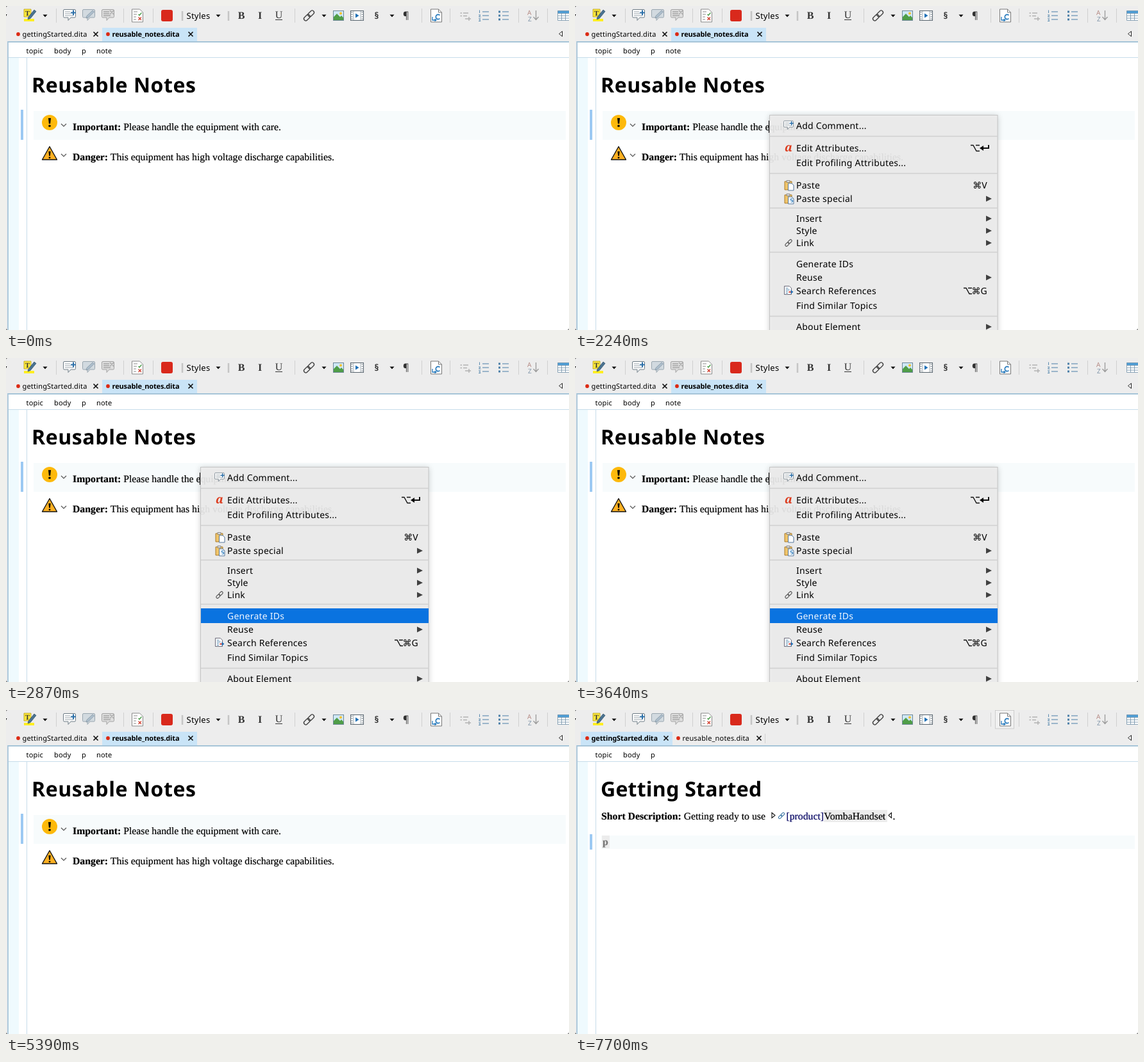
These frames come from a looping animation (878 by 506 pixels, 8000 ms). An HTML page:

```html
<!DOCTYPE html>
<html lang="en">
<head>
<meta charset="utf-8">
<title>Reusable notes</title>
<style>
html, body { margin: 0; width: 100%; height: 100%; overflow: hidden; background: #fff; }
svg { display: block; width: 878px; height: 506px; text-rendering: geometricPrecision; }
text { white-space: pre; }
.ui { font: 11px "Noto Sans", sans-serif; letter-spacing: .18px; }
.ui .on { font-weight: 700; letter-spacing: -.14px; }
.menu { font: 14px "Noto Sans", sans-serif; letter-spacing: .25px; }
.key { font: 14px "DejaVu Sans", sans-serif; letter-spacing: 0; }
.serif { font: 15.75px "Liberation Serif", serif; fill: currentColor; stroke: currentColor; stroke-width: .2px; }
.b { font-weight: 700; }
.h1 { font: 700 32px "Noto Sans", sans-serif; letter-spacing: .4px; }
.mark { font: 700 16px "Liberation Serif", serif; text-anchor: middle; fill: #333; }
.line { fill: none; stroke: #d0d0d0; }

.t { animation: 8s step-end infinite; }
.page1 { animation-name: page1; }
.page2 { animation-name: page2; }
.saved { animation-name: saved; }
.dirty { animation-name: dirty; }
.caret1 { animation-name: caret1; }
.caret2 { animation-name: caret2; }
.pointer { animation-name: pointer; }
.popup { animation-name: popup; }
.pick { animation-name: pick; }
.hover { animation-name: hover; }

@keyframes page1 { 0% { opacity: 1 } 69.125%, to { opacity: 0 } }
@keyframes page2 { 0% { opacity: 0 } 69.125%, to { opacity: 1 } }
@keyframes saved { 0%, 54.25% { opacity: 1 } 47.25%, 69.125%, to { opacity: 0 } }
@keyframes dirty { 0%, 54.25%, to { opacity: 0 } 47.25% { opacity: 1 } }
@keyframes caret1 { 0%, 54.25%, 67.375%, to { opacity: 0 } 14%, 60.375% { opacity: 1 } }
@keyframes caret2 { 0%, 82.25%, 95.375%, to { opacity: 0 } 76.125%, 89.25% { opacity: 1 } }
@keyframes pointer { 0%, 21%, to { opacity: 0 } 19.25% { opacity: 1 } }
@keyframes popup { 0%, 47.25%, to { opacity: 0 } 21% { opacity: 1 } 46.375% { opacity: .5 } }
@keyframes hover { 0% { opacity: 0 } 94.5%, to { opacity: 1 } }
@keyframes pick {
  0%, 28%, 34.125%, 44.625%, 46.375%, to { transform: translateY(-99px) }
  22.75% { transform: translateY(175px) }
  28.875% { transform: translateY(210px) }
  29.75% { transform: translateY(233px) }
  30.625% { transform: translateY(289px) }
  31.5% { transform: translateY(320px) }
  32.375% { transform: translateY(358px) }
  35.875%, 45.5% { transform: translateY(391px) }
}
</style>
</head>
<body>
<svg viewBox="0 0 878 506" xmlns="http://www.w3.org/2000/svg">
<defs>
  <path id="down" d="M-3.5-1.5h7L0 2.2z"/>
  <path id="close" d="M-3.5-3.5l7 7m0-7l-7 7" fill="none" stroke="#111" stroke-width="1.7"/>
  <circle id="dot" r="2.9" fill="#dc2a14"/>
  <path id="chev" d="M-4-2l4 4 4-4" fill="none" stroke="#555" stroke-width="1.2"/>
  <path id="bubble" d="M-8-8.5h16q1.500 0 1.500 1.500v9.500q0 1.500-1.500 1.500h-6l-4 4.500v-4.500h-6q-1.500 0-1.500-1.500v-9.500q0-1.500 1.500-1.500z"/>
  <path id="sheet" d="M-8.5-10h12l5 5v15h-17z"/>
  <g id="comment">
    <use href="#bubble" fill="#fff" stroke="#6c7a84"/>
    <path d="M-7-5h8m-8 3h9m-9 3h13" stroke="#9aa4ab"/>
    <path d="M6-7.500v8M2-3.500h8" stroke="#2a6ea8" stroke-width="2"/>
  </g>
  <g id="link" fill="none" transform="rotate(-45)">
    <rect x="-10" y="-3" width="11" height="6" rx="3"/>
    <rect x="-1" y="-3" width="11" height="6" rx="3"/>
  </g>
  <path id="sub" d="M641-4.5l9 4.5-9 4.5z" opacity=".72"/>
  <g id="bang"><path d="M-2-7.500h4l-.9 8.800h-2.200z"/><circle cy="4.800" r="1.800"/></g>
  <g id="paste">
    <path d="M-7-6h11v13h-11z" fill="#f0c56a" stroke="#a97b2b"/>
    <path d="M-4-7.500h5v3h-5z" fill="#ddd" stroke="#777" stroke-width=".8"/>
    <path d="M-1.500-3h5.500l3 3v8h-8.500z" fill="#fff" stroke="#54779b"/>
  </g>
  <clipPath id="row"><rect class="t pick" x="304" width="355" height="23"/></clipPath>
</defs>

<!-- window -->
<rect width="878" height="506" fill="#fff"/>
<path d="M0 0h878v56H3v450H0z" fill="#ededed"/>
<rect x="4" y="81" width="16" height="425" fill="#effafe"/>
<path d="M32.500 81v425M4 80.500h874" class="line" style="stroke:#c6dcea"/>
<path d="M878 56H3v450" fill="none" stroke="#a6c4d8" stroke-width="1.800"/>

<!-- toolbar -->
<rect class="t hover" x="655.500" y=".5" width="29" height="28.500" fill="#f1f1f1" stroke="#cdcdcd"/>
<path class="line" d="M78.500 4v22M183.500 4v22M229.500 4v22M450.500 4v22M648.500 4v22M692.500 4v22M799.500 4v22M844.500 4v22"/>
<path class="line" d="M275 8v15M347 8v15" stroke-width="2.500" style="stroke:#c5c5c5"/>
<path d="M0 13h1.500l-1.500 3z"/>
<use href="#down" x="61" y="15"/>
<use href="#down" x="331" y="15"/>
<use href="#down" x="496" y="15"/>
<use href="#down" x="602" y="15"/>

<path d="M28 5h11v12h-11z" fill="#ffe83b" stroke="#b5a01a" stroke-width=".8"/>
<path d="M28 20h16v4h-16z" fill="#ffee22"/>
<text x="33.500" y="15" class="mark" style="font-size:11px">T</text>
<path d="M44 6l3 2.500-9 11-4 1.500 1-4z" fill="#4a7391" stroke="#2b4c68" stroke-width=".7"/>

<use href="#comment" x="99" y="14"/>
<g transform="translate(129 14)">
  <use href="#bubble" fill="#d2dae0" stroke="#98a5af"/>
  <path d="M6-7l2.500 2-9 9-3.500 1 1-3.500z" fill="#aebfcd" stroke="#8293a1" stroke-width=".8"/>
</g>
<g transform="translate(159 14)">
  <use href="#bubble" fill="#dedede" stroke="#a2a2a2"/>
  <path d="M-7-5h9m-9 3h9m-9 3h11M3-7l6 6m0-6l-6 6" stroke="#a6a6a6" stroke-width="1.300"/>
</g>
<g transform="translate(205 15)">
  <use href="#sheet" fill="#fff" stroke="#888"/>
  <path d="M-6-6h6m-6 4h5m-5 4h4m-4 4h4" stroke="#8a8a8a"/>
  <path d="M1.500-2l1.500 1.500 3.500-4" fill="none" stroke="#3c963c" stroke-width="1.200"/>
  <path d="M1.500 2.500l4.500 4.500m0-4.500l-4.500 4.500" stroke="#d23a2a" stroke-width="1.300"/>
</g>
<rect x="242" y="6" width="18" height="18" rx="3" fill="#d9291c"/>
<text x="281.500" y="20" class="menu" style="font-size:13px">Styles</text>
<text x="367" y="20" class="mark">B</text>
<text x="396" y="20" class="mark" font-style="italic">I</text>
<text x="425.500" y="19" class="mark" style="font-weight:400">U</text>
<path d="M420 21.500h11" stroke="#333"/>
<g transform="translate(472.500 15)" stroke="#444" stroke-width="1.400"><use href="#link"/></g>
<g transform="translate(518.500 15)">
  <rect x="-8" y="-7.500" width="16" height="15" fill="#cfe8f6" stroke="#6d8797"/>
  <path d="M-7.500 7v-5l5-5 5 5 2-2 3 3v4z" fill="#4f9e48"/>
  <circle cx="3.500" cy="-3.500" r="2" fill="#f6c22d"/>
</g>
<g transform="translate(547.500 15)">
  <rect x="-10" y="-7.500" width="20" height="15" fill="#fff" stroke="#55626c"/>
  <path d="M-8-6v13M8-6v13" stroke="#6a767f" stroke-width="1.500" stroke-dasharray="1.500 2"/>
  <path d="M-5.500-7v14M5.500-7v14" stroke="#8a969e" stroke-width=".8"/>
  <path d="M-2.500-3.500l5.500 3.500-5.500 3.500z" fill="#1f6fb5"/>
</g>
<text x="578" y="20" class="mark" style="font:700 14px 'Noto Sans',sans-serif">§</text>
<text x="624" y="20" class="mark" style="font:15px 'Noto Sans',sans-serif">¶</text>
<g transform="translate(671 15)">
  <use href="#sheet" fill="#fff" stroke="#777"/>
  <path d="M3.500-10v5h5" fill="none" stroke="#777"/>
  <path d="M5.500-.5a3.600 3.600 0 1 0 0 5" fill="none" stroke="#2277bb" stroke-width="1.600"/>
  <path d="M-6 2v5h4" fill="none" stroke="#2277bb" stroke-width="1.300"/>
  <path d="M-2.500 4.500l3.500 2.500-3.500 2.500z" fill="#2277bb"/>
</g>
<g fill="none" stroke="#b2b2b2" stroke-width="1.500">
  <path d="M713 11h8M713 15.500h6M716 20h3M719 20h6M722 17v6"/>
  <path d="M708.500 11h2.500M708.500 15.500h2.500"/>
</g>
<g fill="none" stroke="#4a7fa8" stroke-width="1.200">
  <path d="M743 9h10M743 15h10M743 21h10"/>
  <path d="M738.500 6.500v4.500M737 14h3l-2.500 3h3M737 20h3l-1.500 1.500 1.500 2h-3" stroke-width=".9"/>
  <path d="M774 9h10M774 15h10M774 21h10"/>
  <path d="M768 9h3M768 15h3M768 21h3" stroke-width="3"/>
</g>
<g style="font:10px 'Noto Sans',sans-serif">
  <text x="813" y="14" fill="#b58a84">A</text><text x="814" y="24" fill="#8498ab">Z</text>
  <path d="M826.500 7v14m-4-4l4 4.500 4-4.500" fill="none" stroke="#999" stroke-width="1.300"/>
</g>
<path d="M860.500 7.500h18v15h-18z" fill="#fff"/>
<path d="M860.500 7.500h18v4h-18z" fill="#4f9ed6"/>
<path d="M878 7.500h-17.500v15h17.500M860.500 11.500h18M860.500 15.200h18M860.500 19h18M866.500 11v11.500M872.500 11v11.500" fill="none" stroke="#6f8fa6" stroke-width=".8"/>
<path d="M867.500 39.500v8l-5-4z" fill="#fff" stroke="#222"/>

<!-- tabs -->
<g class="ui">
  <g class="t page1">
    <use href="#dot" x="19" y="44"/>
    <text x="25.500" y="48">gettingStarted.dita</text>
    <use href="#close" x="140" y="44"/>
  </g>
  <g class="t saved">
    <path d="M150 34h148v21h-148z" fill="#c9e4f7"/>
    <use href="#dot" x="159" y="44"/>
    <text class="on" x="165.500" y="48">reusable_notes.dita</text>
    <use href="#close" x="288" y="44"/>
  </g>
  <g class="t dirty">
    <path d="M150 34h153v21h-153z" fill="#c9e4f7"/>
    <use href="#dot" x="158" y="44"/>
    <text class="on" x="164.500" y="48">reusable_notes.dita*</text>
    <use href="#close" x="293" y="44"/>
  </g>
  <g class="t page2">
    <path d="M9 34h143v21h-143z" fill="#c9e4f7"/>
    <use href="#dot" x="19" y="44"/>
    <text class="on" x="25.500" y="48">gettingStarted.dita</text>
    <use href="#close" x="142" y="44"/>
    <use href="#dot" x="161" y="44"/>
    <text x="167.500" y="48">reusable_notes.dita</text>
    <use href="#close" x="287" y="44"/>
    <path class="line" d="M296.500 37v15"/>
  </g>
  <text x="31.500" y="74">topic</text>
  <text x="75" y="74">body</text>
  <text x="118" y="74">p</text>
  <text class="t page1" x="141" y="74">note</text>
</g>

<!-- notes page -->
<g class="t page1">
  <rect x="43" y="164" width="830" height="45" fill="#f7fbfc"/>
  <rect x="23" y="162" width="4" height="47" fill="#9cc9f3"/>
  <text class="h1" x="40" y="135" style="letter-spacing:.6px">Reusable Notes</text>
  <circle cx="68" cy="182" r="12" fill="#fdb90b"/>
  <use href="#bang" x="68" y="182.500"/>
  <path d="M68 219.500l11.500 20.500h-23z" fill="#fdb022" stroke="#111" stroke-width="1.400" stroke-linejoin="round"/>
  <g transform="translate(68 233) scale(.8)"><use href="#bang"/></g>
  <use href="#chev" x="90" y="186"/>
  <use href="#chev" x="90" y="233"/>
  <text class="serif" x="104" y="194"><tspan class="b">Important:</tspan> Please handle the equipment with care.</text>
  <text class="serif" x="104" y="241"><tspan class="b">Danger:</tspan> This equipment has high voltage discharge capabilities.</text>
  <rect class="t caret1" x="302" y="179" width="2" height="19"/>
  <path class="t pointer" d="M303.500 186v15l3.500-3.300 2.300 5.400 2.600-1.100-2.300-5.200h4.800z" stroke="#fff" stroke-width=".9"/>
</g>

<!-- topic page -->
<g class="t page2">
  <rect x="41" y="196" width="832" height="21" fill="#f7fbfc"/>
  <rect x="23" y="194" width="4" height="24" fill="#9cc9f3"/>
  <text class="h1" x="40" y="135" style="letter-spacing:.25px">Getting Started</text>
  <rect x="388" y="156" width="99" height="19" fill="#ececec"/>
  <text class="serif" x="41" y="171"><tspan class="b">Short Description:</tspan> Getting ready to use</text>
  <path d="M307 160.500v8l5-4zM493.500 160.500v8l-4.500-4z" fill="#fff" stroke="#111" stroke-width="1.100"/>
  <g transform="translate(322 165) scale(.58)" stroke="#3a74a3" stroke-width="1.900"><use href="#link"/></g>
  <text class="serif" x="329.500" y="171" color="#000060">[product]</text>
  <text class="serif" x="388.300" y="171">VombaHandset</text>
  <text class="serif" x="495.500" y="171">.</text>
  <rect x="42" y="196" width="12" height="20" fill="#ececec"/>
  <text class="serif" x="43" y="211" color="#777"><tspan class="b">p</tspan></text>
  <rect class="t caret2" x="40" y="194" width="2" height="23"/>
</g>

<!-- context menu -->
<g class="t popup">
  <rect x="303.500" y="170.500" width="355.500" height="350" fill="#ececec" fill-opacity=".93" stroke="#c4c4c4" style="filter:drop-shadow(0 1px 4px rgba(0,0,0,.2))"/>
  <path class="line" d="M304 203.500h355M304 261.500h355M304 315.500h355M304 384.500h355M304 484.500h355" stroke-width="1.500"/>
  <g id="labels" class="menu">
    <text x="345" y="192">Add Comment...</text>
    <text x="345" y="227">Edit Attributes...</text>
    <text x="345" y="250">Edit Profiling Attributes...</text>
    <text x="345" y="285">Paste</text>
    <text x="345" y="306">Paste special</text>
    <text x="345" y="337">Insert</text>
    <text x="345" y="356">Style</text>
    <text x="345" y="375">Link</text>
    <text x="345" y="408">Generate IDs</text>
    <text x="345" y="429">Reuse</text>
    <text x="345" y="450">Search References</text>
    <text x="345" y="473">Find Similar Topics</text>
    <text x="345" y="506">About Element</text>
    <path d="M617 217.500h4l5 9h5M625 217.500h6" fill="none" stroke="#111" stroke-width="1.400"/>
    <path d="M645 217v5h-9" fill="none" stroke="#111" stroke-width="2"/>
    <path d="M631 222l6-4v8z"/>
    <text x="643" y="285" text-anchor="end"><tspan class="key">⌘</tspan>V</text>
    <path d="M606 440.500h4l5 9h4M613 440.500h6" fill="none" stroke="#111" stroke-width="1.400"/>
    <text x="643" y="450" text-anchor="end"><tspan class="key">⌘</tspan>G</text>
    <use href="#sub" y="301"/>
    <use href="#sub" y="332"/>
    <use href="#sub" y="351"/>
    <use href="#sub" y="370"/>
    <use href="#sub" y="424"/>
    <use href="#sub" y="501"/>
  </g>
  <g clip-path="url(#row)">
    <rect x="304" y="171" width="355" height="335" fill="#0a73e0"/>
    <use href="#labels" fill="#f0f7ff"/>
  </g>
  <g transform="translate(333 186) scale(.78)"><use href="#comment"/></g>
  <text x="333" y="227" text-anchor="middle" fill="#dc3a1c" style="font:italic 700 18px 'Noto Serif',serif">a</text>
  <use href="#paste" x="334" y="280"/>
  <use href="#paste" x="334" y="301"/>
  <path d="M339.500 301h-3v2.500h3v2.500h-3" fill="none" stroke="#2277bb"/>
  <g transform="translate(333 370) scale(.65)" stroke="#555" stroke-width="1.800"><use href="#link"/></g>
  <g transform="translate(332 444) scale(.65)">
    <use href="#sheet" fill="#fff" stroke="#667" stroke-width="1.500"/>
    <path d="M-5-5h6m-6 4h9m-9 4h5m-5 4h5" stroke="#4a7fa8" stroke-width="1.500"/>
    <path d="M2 4h6" stroke="#d23a2a" stroke-width="3"/>
    <path d="M7-1l6 5-6 5z" fill="#1f6fb5"/>
  </g>
</g>

<path d="M0 502.500q0 3.500 3.500 3.500H0zM878 502.500q0 3.500-3.500 3.500h3.500zM0 3q0-3 3-3H0z" fill="#555"/>
</svg>
</body>
</html>
```
